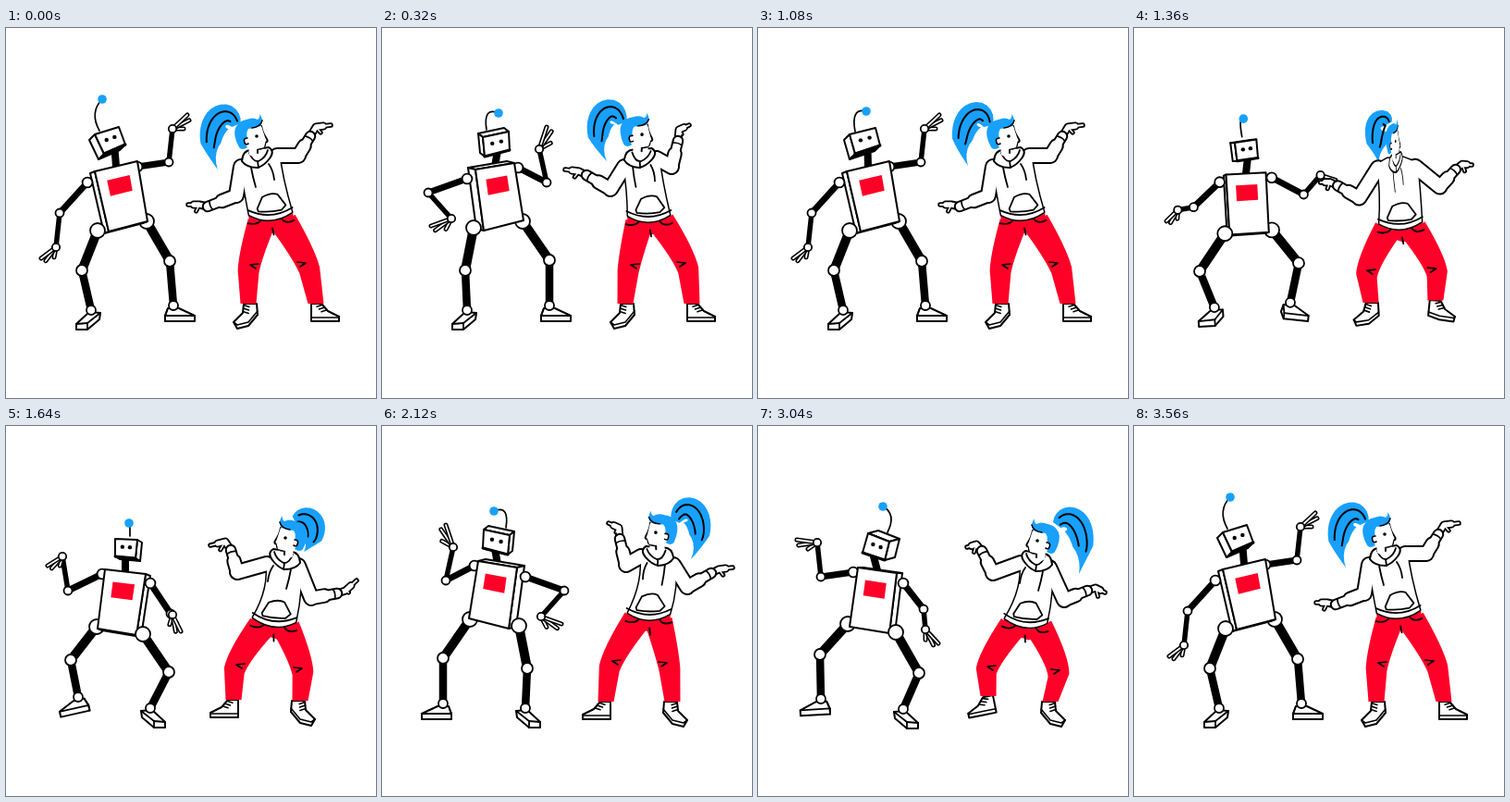
Recreate the animation shown at these times as an HTML page with a canvas. Size 400 by 400 pixels, loop 3.6 s.

```html
<!DOCTYPE html>
<html lang="en">
<head>
<meta charset="utf-8">
<title>Robot dance</title>
<style>
html, body { margin: 0; width: 100%; height: 100%; overflow: hidden; background: #fff; }
canvas { display: block; width: 400px; height: 400px; }
</style>
</head>
<body>
<canvas id="stage" width="400" height="400"></canvas>
<script>
const c = document.getElementById('stage').getContext('2d');
const INK = '#000', PAPER = '#fff', BLUE = '#18a0fb', RED = '#ff0028';
const LOOP = 3600, STEP = 40;
c.lineJoin = c.lineCap = 'round';

// ---- poses: flat x,y lists; a = arm, l = leg, L/R = screen side
// m = [side faced, left foot turn, right foot turn, head tilt]
const robot = {
  up: {
    aL: [88,167, 58,200, 54,237, 38,249], aR: [142,150, 176,145, 180,109, 196,94],
    lL: [99,219, 82,262, 92,305], lR: [152,209, 177,252, 181,300],
    box: [96,155, 142,144, 153,209, 111,220, -5,2],
    head: [96,115, 122,107, 129,126, 106,136, -6,6],
    ant: [101,111, 90,91, 104,77], m: [0, 0, 0, 0]
  },
  bent: {
    aL: [92,163, 50,178, 75,206, 53,214], aR: [147,151, 178,167, 170,131, 178,107],
    lL: [99,216, 90,262, 92,305], lR: [152,209, 181,251, 181,300],
    box: [101,153, 143,146, 153,208, 110,219, -8,-2],
    head: [109,118, 137,112, 138,132, 111,139, -5,-4],
    ant: [113,110, 109,85, 126,92], m: [0, 0, 0, 0]
  },
  land: {
    aL: [104,160, 67,178, 61,141, 45,151], aR: [156,170, 178,203, 180,204, 189,222],
    lL: [98,217, 70,253, 78,293], lR: [148,225, 176,266, 156,305],
    box: [107,155, 151,160, 141,226, 99,219, 5,2],
    head: [118,122, 142,123, 140,143, 118,141, 5,3],
    ant: [134,119, 134,96, 133,105], m: [1, -.22, 0, 0]
  },
  near: {
    aL: [102,151, 71,167, 79,130, 72,108], aR: [156,164, 190,175, 170,209, 192,213],
    lL: [97,210, 67,248, 66,300], lR: [149,217, 159,266, 156,303],
    box: [105,149, 143,154, 138,218, 97,212, 12,2],
    head: [119,113, 142,117, 140,138, 117,133, 11,-3],
    ant: [141,108, 146,90, 132,86], m: [1, 0, 0, 0]
  },
  leave: {
    aL: [103,158, 68,163, 64,126, 42,123], aR: [157,170, 179,198, 181,220, 195,235],
    lL: [97,214, 67,247, 68,295], lR: [149,223, 174,267, 157,306],
    box: [108,153, 150,159, 142,224, 99,217, 6,0],
    head: [119,116, 142,125, 137,145, 113,137, 11,-3],
    ant: [140,115, 150,95, 135,87], m: [1, -.06, 0, 0]
  }
};
robot.back = { ...robot.up, head: [99,115, 127,108, 132,127, 105,136, -6,6], ant: [105,112, 100,86, 117,90] };
robot.spread = { aL: [95,164, 62,190, 38,180, 26,190], aR: [152,164, 185,190, 209,180, 221,190] };

const girl = {
  up: {
    aL: [254,150, 249,181, 218,193, 209,191, 197,191], aR: [293,138, 316,138, 329,117, 335,107, 351,105],
    lL: [276,211, 262,252, 262,298], lR: [300,210, 326,250, 335,298],
    body: [263,202, 309,199, 271,140, 269,118], tail: [249,105, 238,78, 207,112, 229,153], m: [0, 0, 0, 0]
  },
  bent: {
    aL: [262,150, 247,174, 221,159, 213,155, 198,153], aR: [297,141, 313,150, 320,122, 321,110, 332,105],
    lL: [278,211, 267,252, 263,298], lR: [302,210, 330,250, 335,298],
    body: [266,203, 311,202, 278,140, 279,116], tail: [260,103, 248,70, 219,108, 243,144], m: [0, 0, 0, .08]
  },
  land: {
    aL: [282,149, 250,158, 243,134, 237,125, 221,129], aR: [316,151, 330,186, 358,181, 367,178, 379,167],
    lL: [276,217, 247,254, 246,296], lR: [303,218, 322,258, 318,297],
    body: [267,207, 313,212, 302,144, 304,122], tail: [312,102, 330,92, 340,117, 322,136], m: [1, 0, 0, 0]
  },
  near: {
    aL: [287,141, 260,150, 259,122, 254,111, 239,106], aR: [315,150, 326,176, 352,165, 360,161, 375,154],
    lL: [277,210, 250,252, 245,298], lR: [303,210, 313,256, 313,298],
    body: [269,202, 314,204, 302,139, 302,116], tail: [317,103, 328,68, 356,112, 336,141], m: [1, 0, 0, 0]
  },
  leave: {
    aL: [284,148, 254,159, 242,135, 236,128, 226,131], aR: [315,153, 331,188, 356,178, 365,175, 375,180],
    lL: [275,217, 246,256, 249,292], lR: [304,218, 328,260, 316,298],
    body: [267,208, 312,213, 302,146, 304,125], tail: [323,107, 338,86, 361,116, 347,160], m: [1, -.2, 0, 0]
  }
};
girl.back = { ...girl.up, tail: [249,106, 242,74, 207,108, 227,149] };
girl.spread = { aL: [266,150, 243,178, 222,164, 214,159, 203,157], aR: [311,150, 334,178, 355,164, 363,159, 374,157] };

// ---- tweening
const mixList = (a, b, k) => a.map((v, i) => v + (b[i] - v) * k);
const mix = (a, b, k) => Object.fromEntries(Object.keys(a).map(n => [n, mixList(a[n], b[n], k)]));

function flip(p, axis) {
  const o = {};
  for (const n in p) {
    const v = p[n].map((x, i) => i % 2 ? x : axis - x);
    const to = n.endsWith('L') ? n[0] + 'R' : n.endsWith('R') ? n[0] + 'L' : n;
    if (n === 'box' || n === 'head')
      o[n] = [v[2], v[3], v[0], v[1], v[6], v[7], v[4], v[5], -p[n][8], p[n][9]];
    else if (n === 'body') o[n] = [v[2], v[3], v[0], v[1], ...v.slice(4)];
    else if (n === 'm') o[n] = [1 - p.m[0], -p.m[2], -p.m[1], -p.m[3]];
    else o[to] = v;
  }
  return o;
}

// the second half of the dance mirrors the first
function timeline(d, axis) {
  const turn = p => flip(p, axis);
  const mid = { ...mix(d.land, turn(d.land), .5), ...d.spread };
  const half = [[0, d.up], [320, d.bent], [600, d.up], [800, turn(d.near)], [1080, d.back],
    [1240, turn(d.leave)], [1440, mid], [1640, d.land], [1760, turn(d.up)]];
  return [...half, ...half.map(([t, p]) => [t + LOOP / 2, turn(p)])];
}

function poseAt(keys, t) {
  const n = keys.length;
  const key = i => {
    const w = Math.floor(i / n), [time, pose] = keys[i - w * n];
    return [time + w * LOOP, pose];
  };
  let i = n - 1;
  while (keys[i][0] > t) i--;
  const [[t0, a], [t1, b], [t2, e], [t3, f]] = [-1, 0, 1, 2].map(j => key(i + j));
  const h = t2 - t1, u = (t - t1) / h, u2 = u * u, u3 = u2 * u, o = {};
  for (const name in b) o[name] = b[name].map((v, j) => {
    const w = e[name][j];
    const g1 = (w - a[name][j]) / (t2 - t0) * h, g2 = (f[name][j] - v) / (t3 - t1) * h;
    return (2*u3 - 3*u2 + 1) * v + (u3 - 2*u2 + u) * g1 + (3*u2 - 2*u3) * w + (u3 - u2) * g2;
  });
  o.m[0] = Math.max(0, Math.min(1, o.m[0]));
  return o;
}

// ---- drawing helpers
const pts = v => v.reduce((r, x, i) => (i % 2 ? r[r.length - 1].push(x) : r.push([x]), r), []);
const at = (a, b, k) => [a[0] + (b[0] - a[0]) * k, a[1] + (b[1] - a[1]) * k];

function trace(list, closed) {
  c.beginPath();
  list.forEach(p => c.lineTo(p[0], p[1]));
  if (closed) c.closePath();
}
function line(list, w = 2, color = INK) {
  trace(list);
  c.lineWidth = w; c.strokeStyle = color; c.stroke();
}
function poly(list, fill = PAPER, w = 2) {
  trace(list, true);
  c.fillStyle = fill; c.fill();
  if (w) { c.lineWidth = w; c.strokeStyle = INK; c.stroke(); }
}
function dot(p, r, fill = PAPER, w = 1.8) {
  c.beginPath(); c.arc(p[0], p[1], r, 0, 7);
  c.fillStyle = fill; c.fill();
  if (w) { c.lineWidth = w; c.strokeStyle = INK; c.stroke(); }
}
function path(d, fill, w = 2) {
  const p = new Path2D(d);
  if (fill) { c.fillStyle = fill; c.fill(p); }
  if (w) { c.lineWidth = w; c.strokeStyle = INK; c.stroke(p); }
}
function local(p, turn, flipX, draw) {
  c.save();
  c.translate(p[0], p[1]); c.rotate(turn); c.scale(flipX, 1);
  draw();
  c.restore();
}

// ---- robot
function block(v, under) {
  const p = pts(v), d = p.pop();
  const back = q => [q[0] + d[0], q[1] + d[1]];
  p.forEach((a, i) => {
    const b = p[(i + 1) % 4];
    if ((b[0] - a[0]) * d[1] - (b[1] - a[1]) * d[0] < 0)
      poly([a, b, back(b), back(a)], i === 2 ? under : PAPER);
  });
  poly(p);
  return (u, w) => at(at(p[0], p[1], u), at(p[3], p[2], u), w);
}

function robotArm(v, dir) {
  const [s, e, w, t] = pts(v);
  line([s, e], 7); line([e, w], 5.5);
  const a = Math.atan2(t[1] - w[1], t[0] - w[0]), r = Math.hypot(t[0] - w[0], t[1] - w[1]);
  [[dir * .75, .55], [dir * .28, .92], [0, 1]].forEach(([da, k]) => {
    const f = [w, [w[0] + r * k * Math.cos(a + da), w[1] + r * k * Math.sin(a + da)]];
    line(f, 5); line(f, 1.8, PAPER);
  });
  dot(s, 5.4); dot(e, 4.5); dot(w, 4.2);
}

const FOOT = [[10,3, 9,10, -4,21, -16,21, -16,15, -2,2, -4,14], [6,3, 9,11, 9,17, -23,17, -23,11, -6,3, 9,11]];
function robotLeg(v, side, turn, dir) {
  const [h, k, a] = pts(v);
  local(a, turn, dir, () => {
    const p = pts(mixList(...FOOT, side)), q = p.pop();
    poly(p);
    [0, 2, 4].forEach(i => line([q, p[i]], 1.8));
  });
  line([h, k], 10); line([k, a], 8.5);
  dot(h, 8); dot(k, 6); dot(a, 5);
}

function drawRobot(p) {
  const [s, rL, rR] = p.m;
  const left = () => { robotLeg(p.lL, s, rL, 1); robotArm(p.aL, s < .5 ? -1 : -1); };
  const right = () => { robotLeg(p.lR, 1 - s, rR, -1); robotArm(p.aR, 1); };
  const [far, close] = s < .5 ? [right, left] : [left, right];
  far();
  const mid = (v, i, j) => at(pts(v)[i], pts(v)[j], .5);
  line([mid(p.head, 2, 3), mid(p.box, 0, 1)], 8);
  const chest = block(p.box, PAPER);
  poly([chest(.23, .19), chest(.77, .19), chest(.77, .45), chest(.23, .45)], RED, 0);
  close();

  const [a, b, e] = pts(p.ant);
  c.beginPath(); c.moveTo(...a); c.quadraticCurveTo(...b, ...e);
  c.lineWidth = 1.7; c.strokeStyle = INK; c.stroke();
  const face = block(p.head, INK);
  line([face(0, 1), face(1, 1)], 3);
  dot(face(.34, .43), 2.2, INK, 0);
  dot(face(.69, .43), 2.2, INK, 0);
  dot(e, 4.8, BLUE, 0);
}

// ---- girl
function drawTail(v) {
  const [a, b, d, e] = pts(v);
  const spot = (s, off) => {
    const r = 1 - s, q = i => r*r*r*a[i] + 3*r*r*s*b[i] + 3*r*s*s*d[i] + s*s*s*e[i];
    const g = i => r*r*(b[i] - a[i]) + 2*r*s*(d[i] - b[i]) + s*s*(e[i] - d[i]);
    const w = off * (5 + 9.5 * Math.sin(Math.PI * s ** .85)) * Math.min(1, (1 - s) * 4);
    const l = Math.hypot(g(0), g(1)) || 1;
    return [q(0) - g(1) / l * w, q(1) + g(0) / l * w];
  };
  const run = (from, to, off) => Array.from({ length: 21 }, (_, i) => spot(from + (to - from) * i / 20, off));
  poly([...run(0, 1, 1), ...run(1, 0, -1)], BLUE, 0);
  line(run(.04, .74, .4)); line(run(.1, .8, -.4));
}

const SHOE = [[9,0, 10,12, 0,24, -12,27, -16,20, -6,10, -5,0], [5,0, 5,19, -8,19, -25,19, -25,14, -13,8, -6,0]];
function girlLeg(v, side, turn, dir) {
  const [h, k, a] = pts(v);
  local(a, turn, dir, () => {
    const p = pts(mixList(...SHOE, side)), up = q => [q[0], q[1] - 4];
    poly(p);
    line([up(p[1]), up(p[2]), up(p[3]), p[4]], 1.6);
    [.15, .5, .85].forEach(f => {
      const q = at(p[5], p[6], f);
      line([q, [q[0] + 6, q[1] + 2]], 1.6);
    });
  });
  const side1 = (p, q, r, w) => {
    const l = Math.hypot(r[0] - p[0], r[1] - p[1]);
    return [q[0] - (r[1] - p[1]) / l * w, q[1] + (r[0] - p[0]) / l * w];
  };
  const edge = w => [side1(h, h, k, 15 * w), side1(h, k, a, 12.5 * w), [a[0] - 8.5 * w, a[1]]];
  const [o1, o2, o3] = edge(1), [i1, i2, i3] = edge(-1);
  c.beginPath();
  c.moveTo(...o1);
  c.quadraticCurveTo(...at(o2, o1, .15), ...at(o2, o3, .25)); c.lineTo(...o3); c.lineTo(...i3);
  c.lineTo(...at(i2, i3, .25)); c.quadraticCurveTo(...at(i2, i1, .15), ...i1);
  c.fillStyle = RED; c.fill();
  line([[k[0] + dir * 11, k[1] + 3], [k[0] + dir * 2, k[1] + 4], [k[0] + dir * 8, k[1] + 8]], 1.7);
}

function girlArmHand(v, dir) {
  const [, , w, n, t] = pts(v);
  const thumb = [n, [n[0] + (t[0] - n[0]) * .45 - dir * 2, n[1] + (t[1] - n[1]) * .45 + 7]];
  const palm = at(n, t, .5);
  [[7.5, INK], [3.8, PAPER]].forEach(([x, col]) => {
    line([w, n, palm], x + 1.5, col); line([palm, t], x - 2, col); line(thumb, x - 2.4, col);
  });
}

function drawGirl(p) {
  const [s, rL, rR, tilt] = p.m;
  const [wL, wR, neck, head] = pts(p.body);
  const L = pts(p.aL), R = pts(p.aR), waist = at(wL, wR, .5);
  const lean = Math.atan2(wR[1] - wL[1], wR[0] - wL[0]);
  const face = (1 - 2 * s) || .1, look = Math.sign(face) * Math.max(.35, Math.abs(face));

  drawTail(p.tail);
  girlLeg(p.lL, s, rL, 1);
  girlLeg(p.lR, 1 - s, rR, -1);
  const hips = [p.lL.slice(0, 2), p.lR.slice(0, 2)];
  poly([[wL[0] - 1, wL[1]], [wR[0] + 1, wR[1]], [hips[1][0] + 12, hips[1][1] + 4],
    [waist[0] + 3, waist[1] + 21], [hips[0][0] - 12, hips[0][1] + 4]], RED, 0);
  local(waist, lean, 1, () => {
    path('M-25 9Q-16 12 -11 7M25 9Q16 13 12 7M1 16L2 23', null, 1.8);
  });

  girlArmHand(p.aL, -1);
  girlArmHand(p.aR, 1);

  // hoodie: ink silhouette first, then paper inside it
  const shape = () => {
    c.beginPath();
    c.moveTo(L[0][0] - 1, L[0][1] - 4);
    c.lineTo(neck[0] - 9, neck[1] - 4); c.lineTo(neck[0] + 9, neck[1] - 5);
    c.lineTo(R[0][0] + 2, R[0][1] - 4);
    c.quadraticCurveTo(R[0][0] + 5, R[0][1] + 24, ...wR);
    c.quadraticCurveTo(waist[0], waist[1] + 14, ...wL);
    c.quadraticCurveTo(L[0][0] + 4, L[0][1] + 26, L[0][0] - 1, L[0][1] - 4);
  };
  [[INK, 2], [PAPER, -2]].forEach(([col, grow]) => {
    shape();
    c.fillStyle = c.strokeStyle = col;
    c.fill();
    if (grow > 0) { c.lineWidth = 3; c.stroke(); }
    [L, R].forEach(a => {
      line([a[0], a[1]], 16 + grow, col);
      line([a[1], at(a[1], a[2], .5)], 14.5 + grow, col);
      line([at(a[1], a[2], .4), a[2]], 10.5 + grow, col);
    });
  });
  [L, R].forEach(([, e, w]) => {
    const a = Math.atan2(w[1] - e[1], w[0] - e[0]);
    local(at(e, w, .88), a, 1, () => path('M0 -5Q2 0 0 5', null, 1.7));
  });
  local(waist, lean, 1, () => {
    path('M-24 -5Q0 8 24 -5', null, 1.8);
    path('M-14 -6L-8 -18Q2 -23 9 -20L17 -8L12 -3Q0 -1 -13 -3Z', null, 1.8);
  });

  local(neck, tilt, look, () => {
    path('M-16 4Q-15 -8 -6 -8L13 -11Q20 -7 14 1Q8 9 1 11Q-11 11 -16 4Z', PAPER);
    path('M-8 -5Q-4 5 2 4Q10 0 12 -8M1 4L2 11M-6 11Q-4 22 -1 32M13 7Q18 14 19 24', null, 1.8);
  });
  local(head, tilt, look, () => {
    path('M-7 9L-6 19Q2 25 10 17L9 9Z', PAPER, 0);
    path('M7 -12Q8 -5 13 2Q15 5 11 6Q12 13 3 13L3 17', PAPER);
    path('M-10 -10L7 -12L12 3L10 11L2 13L-8 12Z', PAPER, 0);
    path('M-21 -10Q-17 -18 -9 -19Q-2 -22 3 -19Q6 -21 5 -25Q11 -18 6 -12Q0 -9 -7 -9Q-10 -4 -8 1'
      + 'Q-13 5 -8 11Q-14 15 -17 11Q-24 -2 -21 -10Z', BLUE, 0);
    path('M-8 1Q-13 1 -11 6Q-10 9 -7 7', PAPER, 1.6);
    path('M-3 -10Q6 -11 8 -18', null, 1.5);
    dot([2, -1], 1.8, INK, 0);
  });
}

// ---- loop
const robotKeys = timeline(robot, 247), girlKeys = timeline(girl, 577);
const start = performance.now();
function frame() {
  const t = Math.floor(Math.max(0, performance.now() - start) % LOOP / STEP) * STEP;
  c.fillStyle = PAPER;
  c.fillRect(0, 0, 400, 400);
  drawRobot(poseAt(robotKeys, t));
  drawGirl(poseAt(girlKeys, t));
  requestAnimationFrame(frame);
}
frame();
</script>
</body>
</html>
```
